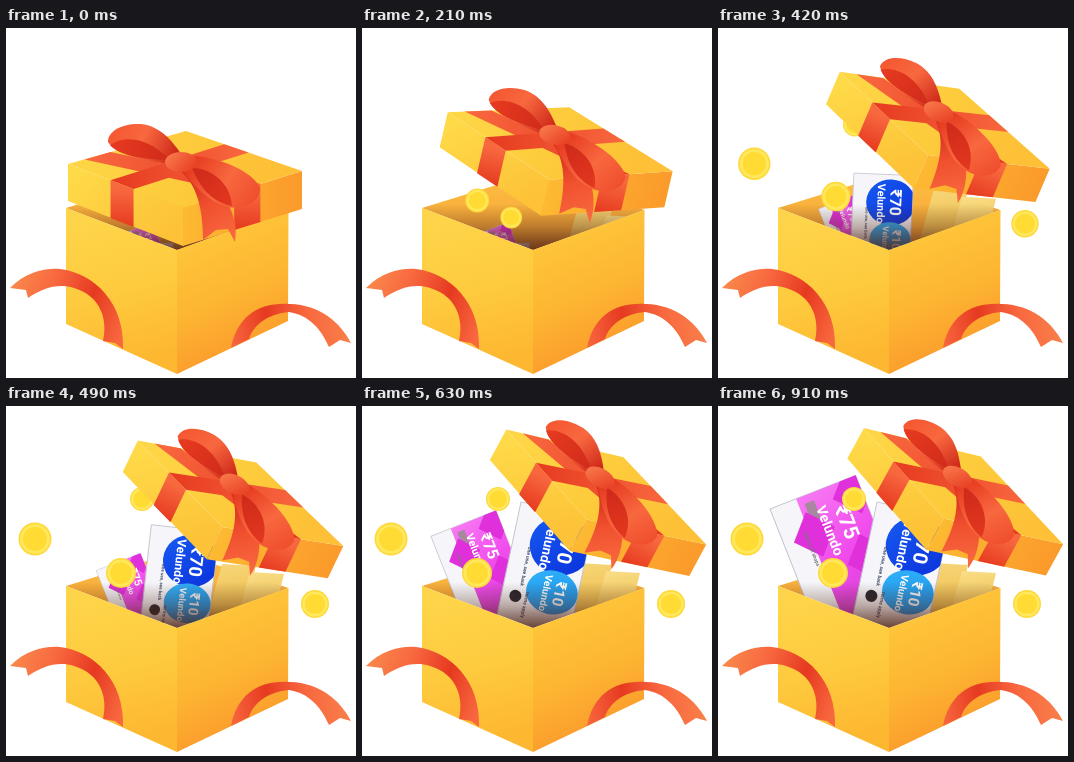
Write an HTML page with a canvas that moves like this. It is 350 px wide and 350 px high and loops after 1750 ms.

```html
<!DOCTYPE html>
<html lang="en">
<head>
<meta charset="utf-8">
<title>Gift box</title>
<style>
html, body { margin: 0; width: 100%; height: 100%; overflow: hidden; background: #fff; }
canvas { display: block; width: 350px; height: 350px; }
</style>
</head>
<body>
<canvas id="stage" width="350" height="350"></canvas>
<script>
const ctx = document.getElementById('stage').getContext('2d');
const LOOP = 1750, STEP = 70, END = 910;

const mix = (a, b, p) => a + (b - a) * p;
const between = (a, b, p) => [mix(a[0], b[0], p), mix(a[1], b[1], p)];
const below = ([x, y], d) => [x, y + d];

// Sine ease-out from 0 to 1; its square is a sine ease-in-out
function rise(t, from, to) {
  const p = Math.min(1, Math.max(0, (t - from) / (to - from)));
  return Math.sin(p * Math.PI / 2);
}

function grad([x0, y0], [x1, y1], ...colors) {
  const g = ctx.createLinearGradient(x0, y0, x1, y1);
  colors.forEach((c, i) => g.addColorStop(i / (colors.length - 1), c));
  return g;
}

function poly(fill, ...points) {
  ctx.beginPath();
  points.forEach(p => ctx.lineTo(...p));
  ctx.closePath();
  ctx.fillStyle = fill;
  ctx.fill();
}

function shape(fill, d) {
  ctx.fillStyle = fill;
  ctx.fill(new Path2D(d));
}

function oval(fill, x, y, rx, ry = rx) {
  ctx.beginPath();
  ctx.ellipse(x, y, rx, ry, 0, 0, 2 * Math.PI);
  ctx.fillStyle = fill;
  ctx.fill();
}

// Text that reads downwards, centred on x, y
function label(text, x, y, size, color = '#fff') {
  ctx.save();
  ctx.translate(x, y);
  ctx.rotate(Math.PI / 2);
  ctx.font = `bold ${size}px Roboto, Arial, sans-serif`;
  ctx.textAlign = 'center';
  ctx.textBaseline = 'middle';
  ctx.fillStyle = color;
  ctx.fillText(text, 0, 0);
  ctx.restore();
}

function price(amount, x, y, size) {
  label('₹' + amount, x, y, size);
  label('Velundo', x - size * .9, y + 2, size * .68);
}

function ticket(x, y, degrees, scale, w, h, paint) {
  ctx.save();
  ctx.translate(x, y);
  ctx.rotate(degrees * Math.PI / 180);
  ctx.scale(scale, scale);
  ctx.beginPath();
  ctx.rect(0, 0, w, h);
  ctx.fillStyle = '#f6f6fa';
  ctx.fill();
  ctx.strokeStyle = '#c4c4ce';
  ctx.stroke();
  ctx.clip();
  paint();
  ctx.restore();
}

function pinkTicket() {
  ctx.fillStyle = grad([30, 0], [91, 130], '#f77af3', '#f04cec', '#d43cd6');
  ctx.fillRect(28, 0, 64, 130);
  poly('#a8889f', [34, 8], [44, 8], [44, 28], [34, 28]);
  for (const [x, y] of [[32, 40], [74, 80], [84, 14]]) {
    poly('#e030dc', [x, y - 24], [x + 22, y], [x, y + 24], [x - 22, y]);
  }
  price(75, 66, 40, 21);
  label('valid in all shops', 24, 52, 5, '#777');
}

function blueTicket() {
  oval(grad([20, 10], [75, 62], '#1658f0', '#0b33dc'), 48, 35, 31, 29);
  oval(grad([40, 60], [60, 104], '#30aef7', '#1b94ec'), 49, 82, 26, 22);
  price(70, 53, 35, 20);
  price(10, 56, 82, 15);
  label('one use, see back', 18, 62, 5, '#45506a');
  label('terms apply', 25, 100, 5, '#45506a');
  oval('#25262e', 14, 93, 6);
}

function tickets(t) {
  const drop = 50 * (1 - rise(t, 0, 560));
  for (const [x, y, fill] of [[216, 157, '#f7d678'], [244, 165, '#f9dd86']]) {
    poly(grad([x, y + drop], [x + 10, y + drop + 50], fill, '#eebd4c'),
      [x, y + drop], [x + 34, y + drop + 2], [x + 22, y + drop + 50], [x - 14, y + drop + 50]);
  }

  const p = rise(t, 210, 850) ** 2;
  ticket(mix(116, 52, p), mix(206, 103, p), -21.5, mix(.35, 1, p ** 1.5), 92, 130, pinkTicket);

  const b = rise(t, 280, 630), lean = b ** 3;
  ticket(mix(130, 159, lean), mix(215, 96, b), 12 * lean, mix(.5, 1, b), 75, 125, blueTicket);
}

// Each coin flies on an arc from its start to its rest place
const COINS = [
  { from: [150, 212], to: [29, 133], r: 16.5 },
  { from: [163, 212], to: [115, 167], r: 15 },
  { from: [275, 130], to: [309, 198], r: 14 },
  { from: [150, 200], to: [136, 93], r: 12 }
];

function coin({ from, to, r }, t) {
  const p = rise(t, 70, 490);
  const x = mix(from[0], to[0], p ** 1.8), y = mix(from[1], to[1], p);
  const size = r * mix(.45, 1, p);
  oval('#ffd73a', x, y, size);
  oval('#ffe85c', x, y, size * .9);
  oval('#ffdb33', x, y, size * .72);
}

const BOX = { left: [60, 180], front: [171, 222], right: [282.5, 182], back: [170, 146] };
const LID = { left: [62, 136], front: [177, 180], right: [296, 143], back: [180, 103] };
const RED = '#e63a20', LIGHT = '#f8683f', DARK = '#cf2a1a';

function opening(fill) {
  poly(fill, BOX.left, BOX.back, BOX.right, BOX.front);
}

function box() {
  const { left, front, right } = BOX;
  const foot = [171, 346];
  poly(grad([90, 185], [130, 335], '#fed54a', '#fecb3f', '#fdb730'), left, front, foot, [60, 296]);
  poly(grad([195, 205], [250, 330], '#fec63b', '#fdb632', '#fb982b'), front, right, [282, 293], foot);

  shape(grad([4, 255], [118, 300], '#f98a4c', LIGHT, RED, LIGHT),
    'M4 260C20 244 38 240 54 241C88 245 119 275 117 321L109 315L97 313C102 292 95 268 68 260C52 255 37 260 22 270L20 262Z');
  shape(grad([225, 320], [344, 300], LIGHT, RED, LIGHT, '#f9804a'),
    'M225 320C231 289 252 274 284 276C314 277 334 294 345 315L334 312L323 319C315 301 303 287 283 284C262 286 248 296 243 311Z');
}

// Ribbon strip over the lid top, from one edge to the opposite one
function strip(a, b, p, q, c, d, r, s) {
  poly(grad(between(a, b, p), between(c, d, s), LIGHT, RED),
    between(a, b, p), between(a, b, q), between(c, d, s), between(c, d, r));
  const u = between(c, d, r), v = between(c, d, s);
  poly(grad(u, below(u, 38), LIGHT, RED), u, v, below(v, 38), below(u, 38));
}

function bow() {
  shape(grad([180, 145], [225, 210], DARK, '#f0502e', LIGHT),
    'M170 139C188 152 197 174 197 212L210 202L222 201L229 214C234 188 215 152 182 136Z');
  shape(grad([102, 100], [168, 130], '#f4552f', LIGHT, DARK),
    'M102 114C102 102 118 95 135 96C154 98 166 112 178 130L168 137C146 133 112 130 102 114Z');
  shape(grad([108, 115], [165, 130], RED, DARK),
    'M104 117C116 108 140 107 164 132C142 132 113 128 104 117Z');
  shape(grad([185, 135], [252, 178], RED, LIGHT, '#ee4a2a'),
    'M178 128C205 126 247 142 254 160C254 174 238 182 222 179C200 173 187 156 175 141Z');
  shape(grad([190, 140], [235, 178], DARK, RED),
    'M186 140C202 140 224 152 226 178C206 174 194 160 186 140Z');
  oval(grad([162, 125], [188, 146], '#fa7a4c', RED), 175, 134, 16, 10);
}

function lid(t) {
  const { left, front, right, back } = LID;
  const p = rise(t, 0, 700);
  ctx.save();
  ctx.translate(left[0] + 84 * p ** 1.6, left[1] - 114 * p);
  ctx.rotate(p / 2);
  ctx.scale(1 - .015 * p, 1 - .06 * p);
  ctx.translate(-left[0], -left[1]);

  poly(grad([80, 140], [150, 215], '#fed948', '#fdc238'), left, front, below(front, 38), below(left, 37));
  poly(grad([180, 180], [290, 180], '#fdb932', '#fb9b2b'), front, right, below(right, 38), below(front, 38));
  poly(grad([90, 120], [260, 160], '#fed545', '#fdcb3c', '#fdc036'), left, back, right, front);
  strip(left, back, .14, .36, front, right, .43, .65);
  strip(right, back, .46, .67, front, left, .43, .63);
  ctx.translate(-6 * p, 0);
  bow();
  ctx.restore();
}

function draw(t) {
  ctx.clearRect(0, 0, 350, 350);
  opening(grad([0, 150], [0, 222], '#fdbd42', '#f3a036'));
  tickets(t);
  opening(grad([0, 176], [0, 222], 'rgba(80,35,20,0)', 'rgba(80,35,20,.35)', 'rgba(80,35,20,.85)'));
  if (t >= STEP) COINS.forEach(c => coin(c, t));
  box();
  lid(t);
}

function tick() {
  const t = performance.now() % LOOP;
  draw(Math.min(END, Math.floor(t / STEP) * STEP));
  requestAnimationFrame(tick);
}
tick();
</script>
</body>
</html>
```
